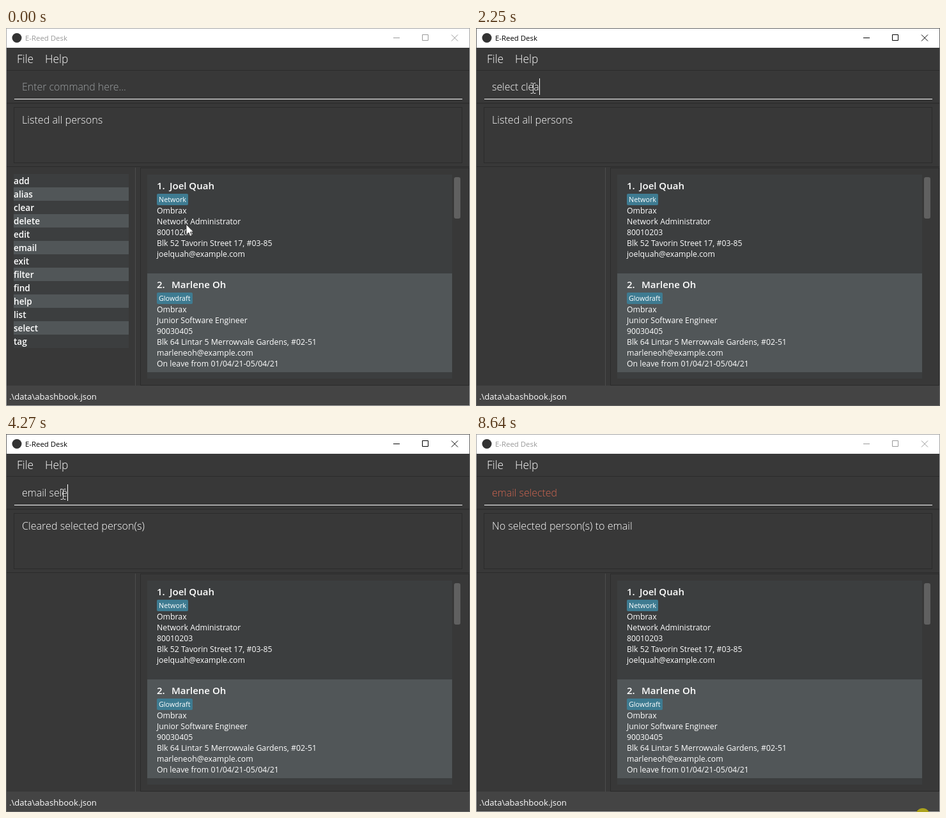
Write an HTML page that moves like this. It is 726 by 593 pixels and loops after 8.72 s.

```html
<!DOCTYPE html>
<html lang="en">
<head>
<meta charset="utf-8">
<title>E-Reed Desk</title>
<style>
html, body { margin: 0; width: 100%; height: 100%; overflow: hidden; background: #383838; }
svg { display: block; width: 726px; height: 593px; }
text { font-family: "Open Sans", "Noto Sans", sans-serif; fill: #fff; white-space: pre; }
.menu { font-size: 17.4px; font-weight: 300; }
.cmd { font-size: 15.9px; font-weight: 300; }
.result { font-size: 16.15px; font-weight: 300; }
.path { font-size: 13.1px; }
.title { font-size: 11.4px; }
.name { font-size: 15px; font-weight: 600; }
.item { font-size: 13.6px; font-weight: 600; }
.info { font-size: 12.3px; }
.tag { font-size: 10.8px; }
</style>
</head>
<body>
<svg id="stage" viewBox="0 0 726 593"></svg>
<script>
const LOOP = 8720, TICK = 77.8;
const ODD = '#515658', EVEN = '#3c3e3f', EDGE = '#2b2b2b', ERROR = '#d06651';
const stage = document.getElementById('stage');

function add(tag, attrs, parent = stage) {
  const el = document.createElementNS('http://www.w3.org/2000/svg', tag);
  for (const key in attrs) el.setAttribute(key, attrs[key]);
  return parent.appendChild(el);
}
function box(x, y, width, height, fill, parent, rx = 0) {
  return add('rect', { x, y, width, height, fill, rx }, parent);
}
function frame(x, y, width, height, stroke) {
  return add('rect', { x: x + .5, y: y + .5, width: width - 1, height: height - 1, fill: 'none', stroke });
}
function label(x, y, cls, str, parent) {
  const el = add('text', { x, y, class: cls }, parent);
  el.textContent = str;
  return el;
}
function show(el, on) { el.setAttribute('visibility', on ? 'visible' : 'hidden'); }
function setText(el, str) { if (el.textContent !== str) el.textContent = str; }

// Window and title bar
box(0, 0, 726, 593, '#383838');
box(0, 0, 726, 31, '#fff');
add('circle', { cx: 17, cy: 15.5, r: 7.5, fill: '#333' });
const title = label(30, 20, 'title', 'E-Reed Desk');
const buttons = add('path', { d: 'M606 15.5H616M651.5 10.5H660.5V19.5H651.5ZM697 10.5L707 20.5M707 10.5L697 20.5', fill: 'none' });

// Menu, command box, result box
label(17, 55, 'menu', 'File');
label(61, 55, 'menu', 'Help');
box(0, 66, 726, 1, EDGE);
box(0, 117, 726, 2, '#2f2f2f');
box(13, 111, 701, 1, '#fff');
const prompt = label(25, 98, 'cmd', 'Enter command here...');
prompt.style.fill = '#9b9fa1';
const input = label(25, 98, 'cmd', '');
const caret = box(25, 79, 1, 26, '#fff');
frame(12, 124, 702, 88, EDGE);
const result = label(25, 150, 'result', '');
box(0, 217, 726, 1, EDGE);

// Command list
const commands = 'add alias clear delete edit email exit filter find help list select tag'.split(' ');
const rows = commands.map((c, i) => {
  const g = add('g', {});
  box(12, 229 + 21 * i, 180, 21, i % 2 ? ODD : EVEN, g);
  return { g, text: label(12, 245 + 21 * i, 'item', c, g) };
});
box(202, 219, 1, 342, '#4d4d4d');

// Person cards
frame(210, 219, 515, 342, EDGE);
const people = [
  { name: 'Joel Quah', nameX: 256, tag: 'Network', lines: ['Ombrax', 'Network Administrator', '80010203',
    'Blk 52 Tavorin Street 17, #03-85', 'joelquah@example.com'] },
  { name: 'Marlene Oh', nameX: 259, tag: 'Glowdraft', lines: ['Ombrax', 'Junior Software Engineer', '90030405',
    'Blk 64 Lintar 5 Merrowvale Gardens, #02-51', 'marleneoh@example.com', 'On leave from 01/04/21-05/04/21'] }
];
people.forEach((p, i) => {
  const y = 230 + 155 * i;
  box(221, y, 477, 155, i % 2 ? ODD : EVEN);
  label(236, y + 23, 'name', i + 1 + '.');
  label(p.nameX, y + 23, 'name', p.name);
  const chip = box(236, y + 30, 10, 18, '#3e7b91', stage, 2);
  const tag = label(239, y + 43, 'tag', p.tag);
  chip.setAttribute('width', Math.round(tag.getComputedTextLength() + 6));
  p.lines.forEach((line, n) => label(236, y + 61 + 17 * n, 'info', line));
});
box(221, 540, 477, 10, EVEN);
box(701, 234, 10, 65, '#606060', stage, 3);

// Status bar
box(0, 561, 726, 32, '#444');
label(5, 583, 'path', '.\\data\\abashbook.json');
const border = frame(0, 0, 726, 593, '#777');

// Pointer
const click = add('circle', { cx: 699, cy: 598, r: 11, fill: '#aca31c' });
const arrow = add('path', { d: 'M0 0V16.5L3.8 12.9L6.2 18.6L8.7 17.5L6.3 12H11.4Z', fill: '#fff', stroke: '#222', 'stroke-width': .8 });
const beam = add('path', { d: 'M-3.5 -8.5H-1L.5 -7.5L2 -8.5H4.5M.5 -7.5V6.5M-3.5 7.5H-1L.5 6.5L2 7.5H4.5', fill: 'none', stroke: '#e4e4e4' });

// Each step: time, typed text, list filter
const steps = [[0, '', '']];
function type(from, str, times) {
  times.forEach((t, i) => {
    const text = str.slice(0, from + i + 1);
    steps.push([t, text, text]);
  });
}
steps.push([460, '', ''], [850, 's', ''], [930, 's', 's']);
type(1, 'select clear', [1010, 1160, 1320, 1470, 1620, 1860, 1940, 2020, 2100, 2180, 2260]);
steps.push([2410, '', 'select clear'], [2490, '', ''], [3030, 'e', ''], [3100, 'e', 'e']);
type(1, 'email selected', [3260, 3340, 3490, 3650, 3730, 3890, 4040, 4190, 4270, 4500, 4580, 4730, 5050]);
const CLEARED = 2410, ENTER = 5510, FOCUS = 460, BLUR = 8560;

// Pointer keys: time, x, y
const route = [
  [0, 282, 308], [390, 89, 95], [5900, 89, 95], [6140, 60, 158], [6420, 247, 160], [6700, 20, 162],
  [6860, 120, 186], [7070, 9, 150], [7390, 103, 109], [7560, 150, 130], [8100, 681, 490], [8400, 697, 574],
  [8560, 699, 600], [LOOP, 699, 600]
];
function pointerAt(t) {
  let i = 0;
  while (i < route.length - 2 && t >= route[i + 1][0]) i++;
  const [t0, x0, y0] = route[i], [t1, x1, y1] = route[i + 1];
  const u = Math.min(1, (t - t0) / (t1 - t0)), e = u * u * (3 - 2 * u);
  return [Math.round(x0 + (x1 - x0) * e), Math.round(y0 + (y1 - y0) * e)];
}
function overText(x, y) {
  return x > 12 && x < 714 && (y > 78 && y < 113 || y > 124 && y < 212);
}

function draw(t) {
  const active = t >= FOCUS && t < BLUR;
  const failed = t >= ENTER;

  title.style.fill = active ? '#000' : '#999';
  buttons.setAttribute('stroke', active ? '#000' : '#999');
  border.setAttribute('stroke', active ? '#666' : '#a6a6a6');

  let now = steps[0], keyTime = FOCUS;
  for (const s of steps) {
    if (s[0] > t) break;
    if (s[1] !== now[1]) keyTime = s[0];
    now = s;
  }
  if (failed) keyTime = ENTER;
  const [, typed, filter] = now;
  const ink = failed ? ERROR : '#fff';

  setText(input, typed);
  input.style.fill = ink;
  show(prompt, t < FOCUS);
  const width = typed ? input.getComputedTextLength() : 0;
  caret.setAttribute('x', Math.ceil(25 + width));
  caret.setAttribute('fill', ink);
  show(caret, active && Math.floor((t - keyTime + 30) / 500) % 2 === 0);

  setText(result, failed ? 'No selected person(s) to email'
    : t >= CLEARED ? 'Cleared selected person(s)' : 'Listed all persons');

  const found = commands.filter(c => c.startsWith(filter.trim()));
  rows.forEach((row, i) => {
    show(row.g, i < found.length);
    setText(row.text, found[i] || '');
  });

  // The pointer is sampled at a fixed rate
  const tick = Math.floor((t + 14) / TICK) * TICK;
  const [x, y] = pointerAt(Math.min(tick, LOOP));
  const text = overText(x, y);
  show(beam, text);
  show(arrow, !text);
  for (const el of [beam, arrow]) el.setAttribute('transform', `translate(${x} ${y})`);
  show(click, t >= BLUR);
}

const start = performance.now();
function loop() {
  draw((performance.now() - start) % LOOP);
  requestAnimationFrame(loop);
}
draw(0);
requestAnimationFrame(loop);
</script>
</body>
</html>
```
